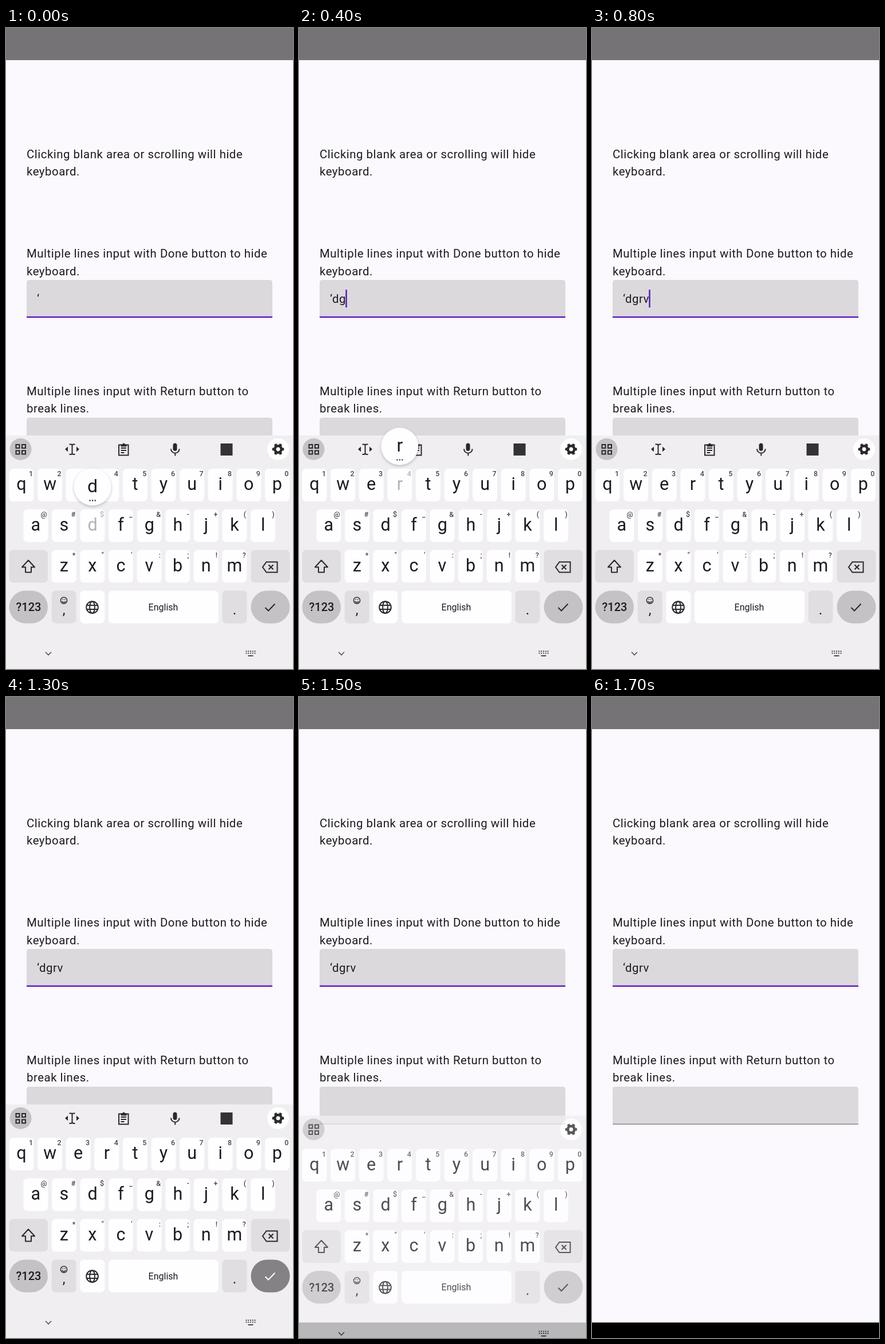
Animation of 501 by 1117 pixels, one loop 1800 ms. Source, as an HTML page:

```html
<!DOCTYPE html>
<html lang="en">
<head>
<meta charset="utf-8">
<title>Keyboard hide demo</title>
<style>
  html, body { margin: 0; width: 100%; height: 100%; overflow: hidden; background: #fbf9fd; }
  svg { display: block; font-family: Roboto, sans-serif; }
  .body { font-size: 20.4px; letter-spacing: .52px; fill: #1c1b1f; white-space: pre; }
  .letter { font-size: 30.5px; text-anchor: middle; fill: #1b1b1d; }
  .hint { font-size: 12.5px; font-weight: 500; text-anchor: end; fill: #464648; }
  .down text { fill: #b3b2b4; }
  .line { fill: none; stroke: #29292b; stroke-width: 2; }
</style>
</head>
<body>
<svg width="501" height="1117" viewBox="0 0 501 1117">
  <rect width="501" height="1117" fill="#fbf9fd"/>
  <rect width="501" height="56" fill="#757376"/>
  <g class="body">
    <text x="36" y="226.5">Clicking blank area or scrolling will hide</text>
    <text x="36" y="257">keyboard.</text>
    <text x="36" y="400">Multiple lines input with Done button to hide</text>
    <text x="36" y="430.5">keyboard.</text>
    <text x="36" y="639.5">Multiple lines input with Return button to</text>
    <text x="36" y="670">break lines.</text>
  </g>
  <path id="field" d="M36 505V444q0-5 5-5H460q5 0 5 5V505z" fill="#dbd9dc"/>
  <use href="#field" y="240"/>
  <path d="M36 503.7H465" stroke="#651fc4" stroke-width="2.6"/>
  <path d="M36 744.3H465" stroke="#79777b" stroke-width="1.3"/>
  <text id="typed" class="body" x="54" y="479"></text>
  <rect id="caret" y="456" width="2.6" height="31" fill="#5b21c9"/>
  <rect y="1090" width="501" height="27" fill="#000"/>

  <g id="board">
    <rect y="710" width="501" height="407" fill="#f0eef1"/>
    <circle cx="25.5" cy="734" r="19" fill="#c4c2c5"/>
    <circle cx="475" cy="734" r="19" fill="#fff"/>
    <path class="line" d="M17.5 726h6v6h-6zM28 726h6v6h-6zM17.5 736.5h6v6h-6zM28 736.5h6v6h-6z"/>
    <g transform="translate(475 734)" fill="none" stroke="#29292b">
      <circle r="5.7" stroke-width="4.6"/>
      <circle r="8.5" stroke-width="3.6" pathLength="12" stroke-dasharray="1" stroke-dashoffset=".5"/>
    </g>
    <g id="tools">
      <path class="line" d="M110.500 725.500h3.500l1.500 1.500 1.500-1.500h3.500M110.500 743h3.500l1.500-1.500 1.500 1.500h3.500M115.500 727v14.500"/>
      <path d="M108 729.500v9l-5-4.500zM123 729.500v9l5-4.500z" fill="#29292b"/>
      <path class="line" d="M197 726.500h16.500v18H197zM200.500 732h9.500M200.500 736h9.500M200.500 740h6"/>
      <path d="M200.500 725.500h3a2 2 0 0 1 4 0h3v4h-10z" fill="#29292b"/>
      <rect x="291.500" y="723.500" width="7" height="13.500" rx="3.500" fill="#29292b"/>
      <path class="line" d="M288 733.500a7.300 7.300 0 0 0 14.600 0M295.300 740.500v5"/>
      <rect x="374.500" y="724" width="21" height="21" fill="#333335"/>
    </g>
    <g id="keys"></g>

    <path class="line" d="M39 927.500L50 939.500H44V948.500H34V939.500H28z" stroke-linejoin="round"/>
    <path class="line" d="M454.500 930.500H473.500V948.500H454.500L448 939.500zM458.500 935.500l8 8M466.500 935.500l-8 8"/>
    <text x="39.500" y="1016" text-anchor="middle" font-size="20" font-weight="500" fill="#1b1b1d">?123</text>
    <g class="line" style="stroke-width:1.500">
      <circle cx="101" cy="997.500" r="5.600"/>
      <path d="M97.800 999q3.200 4 6.400 0M98.500 995.800h1.500M102 995.800h1.500"/>
    </g>
    <text class="letter" x="101" y="1022" style="font-size:24px">,</text>
    <text class="letter" x="399" y="1022" style="font-size:25px">.</text>
    <g class="line">
      <circle cx="150.500" cy="1009.500" r="10.300"/>
      <ellipse cx="150.500" cy="1009.500" rx="4.400" ry="10.300"/>
      <path d="M141 1006H160M141 1013H160"/>
    </g>
    <text x="274.500" y="1014.500" text-anchor="middle" font-size="16" fill="#1b1b1d">English</text>
    <path id="check" class="line" d="M452.500 1010l5.500 5.500 11.500-12"/>
    <path class="line" d="M69 1087.500l5 5 5-5" style="stroke:#555;stroke-width:1.700"/>
    <path d="M418.500 1086h17M418.500 1089.500h17" stroke="#4b4a4c" stroke-width="2" stroke-dasharray="2 1.750"/>
    <path d="M422.500 1094h9" stroke="#4b4a4c" stroke-width="2"/>
  </g>

  <g id="popup">
    <circle cy="2" r="32.500" fill="#000" opacity=".22" style="filter:blur(2.500px)"/>
    <circle r="32.500" fill="#fefdff"/>
    <text class="letter" y="9" style="font-size:32px"></text>
    <path d="M-5.500 23.500H6" stroke="#29292b" stroke-width="2.200" stroke-dasharray="2.200 2.300"/>
  </g>
</svg>
<script>
const $ = id => document.getElementById(id);
const WHITE = '#fefdff', GREY = '#e0dee1', PILL = '#c4c2c5';
const PITCH = 49.6, ROW = 70.8;
const centres = {};

const box = (x, row, w, fill, r = 7, id = '') =>
  `<rect id="${id}" x="${x}" y="${768 + row * ROW}" width="${w}" height="57" rx="${r}" fill="${fill}"/>`;

function letterRow(letters, hints, first, row) {
  return [...letters].map((c, i) => {
    const x = first + i * PITCH, y = 796.5 + row * ROW;
    centres[c] = [x, y];
    return `<g id="key-${c}">${box(x - 21.5, row, 43, WHITE)}
      <text class="letter" x="${x}" y="${y + 8.500}">${c}</text>
      <text class="hint" x="${x + 20}" y="${y - 15.500}">${hints[i].replace('&', '&amp;')}</text></g>`;
  }).join('');
}

$('keys').innerHTML =
  letterRow('qwertyuiop', '1234567890', 27, 0) +
  letterRow('asdfghjkl', '@#$_&-+()', 51.8, 1) +
  letterRow('zxcvbnm', '*"\':;!?', 101.2, 2) +
  box(5.5, 2, 67.5, GREY) + box(427.5, 2, 68, GREY) +
  box(5.5, 3, 67.5, PILL, 28.5) + box(79.7, 3, 43, GREY) +
  box(129.3, 3, 43, WHITE) + box(179, 3, 192, WHITE) +
  box(377.5, 3, 43, GREY) + box(427.5, 3, 68, PILL, 28.5, 'enter');

// Each step overrides the defaults from its start time on.
const defaults = { text: '‘dgrv', caret: 0, key: '', pop: 1, press: 0, drop: 0, alpha: 1 };
const steps = [
  { at: 0, text: '‘', key: 'd' },
  { at: 100, text: '‘d', key: 'd', caret: 1 },
  { at: 200, text: '‘d', key: 'g', caret: 1 },
  { at: 300, text: '‘dg', key: 'g', caret: 1 },
  { at: 400, text: '‘dg', key: 'r', caret: 1 },
  { at: 500, text: '‘dgr', key: 'r', caret: 1 },
  { at: 700, key: 'r', pop: .5, caret: 1 },
  { at: 800, caret: 1 },
  { at: 1300, press: .6 },
  { at: 1400, press: 1 },
  { at: 1500, drop: 19.5, alpha: .77 },
  { at: 1600, drop: 211, alpha: .17 },
  { at: 1700, drop: 407, alpha: 0 }
];

const mix = (a, b, k) => `rgb(${a.map((v, i) => Math.round(v + (b[i] - v) * k))})`;

function draw(s) {
  $('typed').textContent = s.text;
  $('caret').setAttribute('x', 53.2 + $('typed').getComputedTextLength());
  $('caret').style.opacity = s.caret;
  for (const c in centres) $('key-' + c).classList.toggle('down', c === s.key);
  $('popup').style.opacity = s.key ? s.pop : 0;
  if (s.key) {
    const [x, y] = centres[s.key];
    $('popup').setAttribute('transform', `translate(${x} ${y - 67.5})`);
    $('popup').querySelector('text').textContent = s.key;
  }
  $('enter').style.fill = mix([196, 194, 197], [89, 88, 90], s.press);
  $('check').style.stroke = s.press ? '#fff' : '#29292b';
  $('board').setAttribute('transform', `translate(0 ${s.drop})`);
  $('board').style.opacity = s.alpha;
  $('tools').style.opacity = s.drop ? 0 : 1;
}

const start = performance.now();
let shown;
function frame() {
  const t = (performance.now() - start) % 1800;
  const step = steps.findLast(s => s.at <= t);
  if (step !== shown) draw({ ...defaults, ...(shown = step) });
  requestAnimationFrame(frame);
}
frame();
</script>
</body>
</html>
```
